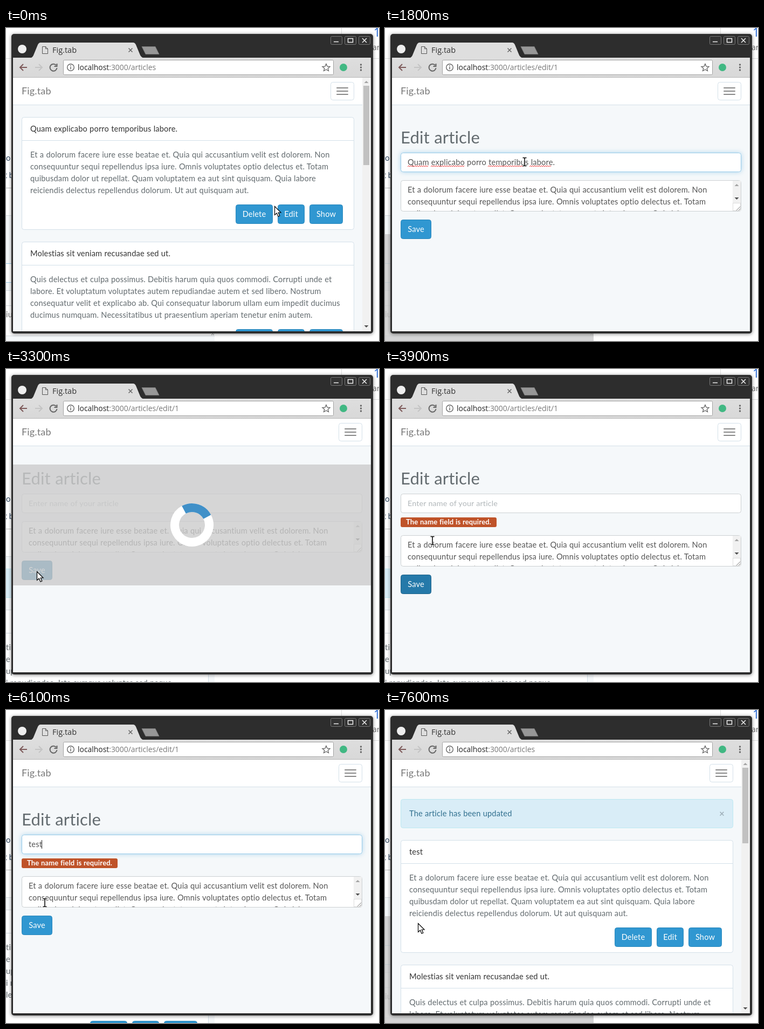
Animation of 692 by 580 pixels, one loop 8 s. Source, as an HTML page:

```html
<!DOCTYPE html>
<html lang="en">
<head>
<meta charset="utf-8">
<title>Article editor</title>
<style>
  html, body { margin: 0; width: 100%; height: 100%; overflow: hidden; background: #fff; }
  svg { display: block; width: 100%; height: 100%; }
  text { font-family: Lato, sans-serif; letter-spacing: .16px; word-spacing: .3px; white-space: pre; }
  .ui { font-family: "Open Sans", "Noto Sans", sans-serif; letter-spacing: 0; word-spacing: 0; }
  .window { filter: drop-shadow(0 1px 3px rgba(0, 0, 0, .5)); }
</style>
</head>
<body>
<svg id="stage" viewBox="0 0 692 580">
  <clipPath id="pageClip"><rect x="13" y="92" width="664" height="470"/></clipPath>
  <clipPath id="areaClip"><rect x="30" y="283" width="615" height="56"/></clipPath>
  <linearGradient id="toolbar" x2="0" y2="1">
    <stop stop-color="#dedede"/><stop offset="1" stop-color="#d8d8d8"/>
  </linearGradient>
  <g id="backdrop"></g>
  <g id="chrome"></g>
  <g id="page" clip-path="url(#pageClip)"></g>
  <g id="pointer"></g>
</svg>
<script>
const LOOP = 8000, STEP = 100;
const SITE = 'Fig.tab';
const BLUE = '#3097d1', LINE = '#d3e0e9', BG = '#f5f8fa', GREY = '#636b6f', VEIL = 'rgba(204,204,204,.8)';
const ARTICLES = [
  ['Quam explicabo porro temporibus labore.', [
    'Et a dolorum facere iure esse beatae et. Quia qui accusantium velit est dolorem. Non',
    'consequuntur sequi repellendus ipsa iure. Omnis voluptates optio delectus et. Totam',
    'quibusdam dolor ut repellat. Quam voluptatem ea aut sint quisquam. Quia labore',
    'reiciendis delectus repellendus dolorum. Ut aut quisquam aut.']],
  ['Molestias sit veniam recusandae sed ut.', [
    'Quis delectus et culpa possimus. Debitis harum quia quos commodi. Corrupti unde et',
    'labore. Et voluptatum voluptates autem repudiandae autem et sed libero. Nostrum',
    'consequatur velit et explicabo ab. Qui consequatur laborum ullam eum impedit ducimus',
    'ducimus numquam. Necessitatibus ut praesentium aperiam tenetur enim autem.']]
];

// Pointer path: time, x, y
const PATH = [
  [0, 498, 330], [100, 498, 330], [200, 520, 336], [300, 534, 338], [800, 534, 338],
  [1300, 267, 261], [1400, 262, 251], [1500, 262, 251], [1600, 259, 248], [2400, 259, 248],
  [2800, 101, 371], [2900, 72, 374], [3000, 57, 375], [3600, 57, 375], [3900, 88, 318],
  [4000, 89, 318], [4400, 89, 250], [5700, 89, 250], [6100, 72, 357], [6400, 61, 395], [LOOP, 61, 395]
];

const clamp = v => Math.max(0, Math.min(1, v));
const inside = (p, x, y, w, h) => p.x >= x && p.x < x + w && p.y >= y && p.y < y + h;

const rect = (x, y, w, h, fill, r = 0, extra = '') =>
  `<rect x="${x}" y="${y}" width="${w}" height="${h}" fill="${fill}" rx="${r}" ${extra}/>`;
const box = (x, y, w, h, fill, stroke, r = 0, extra = '') =>
  rect(x + .5, y + .5, w - 1, h - 1, fill, r, `stroke="${stroke}" ${extra}`);
const path = (d, stroke, width = 1, fill = 'none') =>
  `<path d="${d}" fill="${fill}" stroke="${stroke}" stroke-width="${width}"/>`;
const text = (x, y, s, fill, size = 14.6, extra = '') =>
  `<text x="${x}" y="${y}" fill="${fill}" font-size="${size}" ${extra}>${s}</text>`;
const uiText = (x, y, s, fill, size = 14) => text(x, y, s, fill, size, 'class="ui"');
const lines = (x, y, list, fill) => list.map((s, i) => text(x, y + i * 22, s, fill)).join('');
const button = (x, y, w, label, dark) =>
  box(x, y, w, 36, dark ? '#2579a9' : BLUE, dark ? '#1f648b' : '#2a88bd', 4) +
  text(x + w / 2, y + 23, label, '#fff', 14.6, 'text-anchor="middle"');

function pointerAt(t) {
  const i = PATH.findIndex(k => k[0] > t);
  const [t0, x0, y0] = PATH[i - 1], [t1, x1, y1] = PATH[i];
  const k = (t - t0) / (t1 - t0);
  return { x: Math.round(x0 + (x1 - x0) * k), y: Math.round(y0 + (y1 - y0) * k) };
}

function stateAt(t) {
  const s = { t, p: pointerAt(t) };
  s.editing = t >= 500 && t < 7300;
  s.updated = t >= 7300;
  s.spinStart = t >= 500 && t < 1200 ? 556 : t >= 3200 && t < 3800 ? 3206 : t >= 6700 && t < 7300 ? 6750 : null;
  s.loading = s.spinStart !== null;
  s.loaded = t >= 1200;
  s.error = t >= 3800;
  s.shift = s.error ? 26 : 0;
  s.typed = [4700, 4800, 5100, 5600].filter(k => t >= k).length;
  s.value = !s.loaded ? '' : t < 2400 ? ARTICLES[0][0] : 'test'.slice(0, s.typed);
  s.selected = t >= 2000 && t < 2400;
  s.focus = t < 3200 ? clamp((t - 1500) / 300) : t < 6700 ? clamp((t - 4500) / 300) : 0;
  s.saveFocus = (t >= 3200 && t < 4600) || t >= 6700;
  const active = !s.loading;
  s.overEdit = !s.editing && inside(s.p, 504, 327 + (s.updated ? 76 : 0), 50, 36);
  s.overSave = s.editing && active && inside(s.p, 29, 355 + s.shift, 57, 36);
  s.overField = s.editing && active &&
    (inside(s.p, 29, 231, 632, 36) || inside(s.p, 29, 282 + s.shift, 616, 58));
  return s;
}

function drawBackdrop({ t }) {
  const rule = (y, c = '#d5dbe0') => rect(0, y, 387, 1, c);
  let out = rect(0, 0, 692, 580, '#fff') + rect(0, 56, 692, 1, '#ddd') + rect(622, 0, 1, 56, '#ddd') +
    uiText(682, 16, '1', '#1a5fd0', 22) + uiText(680, 41, 'ar', '#666') +
    uiText(0, 246, 'o', '#1c3550') + uiText(-3, 278, 't b', '#1c3550') +
    rect(0, 296, 20, 1, '#bbb') + rect(0, 347, 387, 233, BG) + rule(347);
  if (t < 2300 || t >= 7600) {
    out += rect(0, 437, 387, 34, '#fff') + rule(436, '#98cbe8') + rule(471, '#98cbe8') +
      rect(0, 486, 387, 84, '#fff') + rule(486) + rule(514) + text(0, 536, 'iu', '#777') + rule(570) +
      path('M381 569l5-5M384 569l2-2', '#777');
    if (t >= 1600) out += rect(0, 382, 387, 198, VEIL);
  } else if (t < 4700) {
    out += rect(0, 370, 387, 54, '#d9edf7') + rule(370, '#bce8f1') + rule(423, '#bce8f1') +
      rect(0, 446, 375, 134, '#fff') + rule(446) + rule(489) + rect(375, 446, 1, 134, LINE) +
      lines(0, 521, ['tiu', 'e', 'up', 'i repudiandae. Iste cumque voluptas sed neque'], GREY);
  } else {
    out += rect(0, 370, 375, 210, '#fff') + rule(370) + rule(413) + rect(375, 370, 1, 210, LINE) +
      lines(0, 445, ['tiu', 'e', 'up', 'i r', 'le'], GREY) +
      button(156, 576, 69, '') + button(234, 576, 50, '') + button(293, 576, 62, '');
  }
  return out;
}

function drawChrome({ editing }) {
  const windowButton = (x, glyph) => box(x, 15, 22, 16, '#333', '#777', 2) + path(glyph, '#eee', 1.5);
  return '<g class="window">' + rect(10, 11, 671, 555, '#2d2d2d', 5) + '</g>' +
    '<circle cx="30" cy="39" r="8" fill="#eee"/>' +
    path('M46 55.5Q50 54 52 48L59 31Q61 27 64 27H236Q239 27 241 31L248 48Q250 54 255 55.5Z', 'none', 0, '#dedede') +
    path('M67.5 34.5h6l4 4v9h-10zM73.500 34.500v4h4', '#555') +
    uiText(86, 46, SITE, '#333', 14.5) + path('M227.500 37.500l7 7m0-7l-7 7', '#666', 1.5) +
    path('M252 34.500H277L284 48.500H259Z', '#777', 1, '#979797') +
    windowButton(602, 'M608 25.500h9') + windowButton(628, 'M634.500 19.500h9v7h-9z') +
    windowButton(654, 'M661 19l8 8m0-8l-8 8') +
    rect(13, 55, 664, 37, 'url(#toolbar)') + rect(13, 91, 664, 1, '#b6b6b6') +
    path('M39 73H26M32 67l-6 6 6 6', '#7d5a5a', 2) + path('M54 73h13M61 67l6 6-6 6', '#c4c4c4', 2) +
    path('M93 69a6.500 6.500 0 1 0 1.500 5M94.500 66v5h-5', '#666', 2) +
    box(106, 59, 502, 28, '#fff', '#a3a3a3', 2) +
    '<circle cx="120" cy="73" r="6.3" fill="none" stroke="#666" stroke-width="1.4"/>' +
    path('M120 69v1.700M120 72v4.500', '#666', 1.5) +
    uiText(133, 78, 'localhost<tspan fill="#777">:3000/articles' + (editing ? '/edit/1' : '') + '</tspan>', '#222', 13.9) +
    path('M594 66.500l2 4.600 5 .4-3.800 3.200 1.200 4.800-4.400-2.600-4.400 2.600 1.200-4.800-3.800-3.200 5-.4z', '#666', 1.3) +
    '<circle cx="626" cy="73" r="7" fill="#41b883"/>' +
    [68, 73, 78].map(y => `<circle cx="658.5" cy="${y}" r="1.7" fill="#666"/>`).join('');
}

function drawNavbar(right) {
  return rect(13, 92, 664, 50, '#fff') + rect(13, 142, 664, 1, LINE) + text(29, 123, SITE, '#777', 18) +
    box(right - 44, 100, 44, 34, '#fff', LINE, 4) +
    [110, 116, 122].map(y => rect(right - 33, y, 22, 2, '#888', 1)).join('');
}

function drawList({ updated, overEdit }) {
  const top = updated ? 241 : 165;
  let out = drawNavbar(646);
  if (updated) {
    out += box(29, 165, 617, 54, '#d9edf7', '#bce8f1', 4) +
      text(45, 197, 'The article has been updated', '#31708f') + text(620, 198, '×', '#9fb0ba', 17, 'font-weight="700"');
  }
  ARTICLES.forEach(([title, body], i) => {
    const y = top + i * 231;
    out += box(29, y, 617, 209, '#fff', LINE, 4) + rect(30, y + 43, 615, 1, LINE) +
      text(45, y + 27, updated && !i ? 'test' : title, '#333') + lines(45, y + 75, body, GREY) +
      button(426, y + 162, 69, 'Delete') + button(504, y + 162, 50, 'Edit', overEdit && !i) +
      button(563, y + 162, 62, 'Show');
  });
  return out + rect(661, 92, 16, 470, '#f1f1f1') + rect(663, 107, 11, updated ? 140 : 147, '#c1c1c1') +
    path('M664.500 102l4-4 4 4z', 'none', 0, '#a3a3a3') + path('M664.500 551l4 4 4-4z', 'none', 0, '#505050');
}

function squiggle(from, to) {
  let d = `M${from} 257`;
  for (let x = from + 2, up = true; x <= to; x += 2, up = !up) d += `L${x} ${up ? 255 : 257}`;
  return path(d, '#e33', 1);
}

function drawNameField(s) {
  const glow = `style="filter:drop-shadow(0 0 4px rgba(152,203,232,${s.focus * .8}))"`;
  let out = box(29, 231, 632, 36, '#fff', s.focus > .5 ? '#98cbe8' : '#ccd0d2', 4, s.focus ? glow : '');
  if (s.selected) out += rect(42, 240, 269, 18, '#3390ff');
  out += s.value ? text(42, 254, s.value, s.selected ? '#fff' : '#555')
    : text(42, 254, 'Enter name of your article', '#b1b7ba', 14.3);
  if (s.focus && s.value.length > 4 && !s.selected) {
    out += squiggle(42, 80) + squiggle(85, 148) + squiggle(191, 262) + squiggle(268, 308);
  }
  if (s.focus && s.value.length <= 4) out += rect([42, 47, 55, 62, 66][s.typed], 241, 1, 16, '#222');
  return out;
}

function drawTextArea(loaded) {
  const grip = path('M652 338l7-7M656 338l3-3', '#777');
  const field = box(29, 282, 632, 58, '#fff', '#ccd0d2', 4);
  if (!loaded) return field + text(42, 305, 'Enter your text', '#b1b7ba') + grip;
  return field + `<g clip-path="url(#areaClip)">${lines(42, 305, ARTICLES[0][1].slice(0, 3), '#555')}</g>` +
    rect(645, 283, 15, 42, '#f1f1f1') + box(645, 324, 15, 15, '#fff', '#ddd') + grip +
    path('M648.500 293l4-4 4 4z', 'none', 0, '#a3a3a3') + path('M648.500 314l4 4 4-4z', 'none', 0, '#505050');
}

function drawSpinner(cy, angle) {
  const a = 32 * Math.SQRT1_2;
  return `<g transform="translate(345 ${cy}) rotate(${angle})">
    <circle r="32" fill="none" stroke="#fff" stroke-width="16"/>
    ${path(`M${-a} ${-a}A32 32 0 0 1 ${a} ${-a}`, '#4090c8', 16)}</g>`;
}

function drawForm(s) {
  let out = drawNavbar(661) + text(29, 214, 'Edit article', GREY, 31) + drawNameField(s);
  if (s.error) {
    out += rect(29, 275, 178, 18, '#bf5329', 3) +
      text(118, 288, 'The name field is required.', '#fff', 13, 'font-weight="700" text-anchor="middle"');
  }
  out += `<g transform="translate(0 ${s.shift})">` + drawTextArea(s.loaded) +
    button(29, 355, 57, 'Save', s.overSave || s.saveFocus) + '</g>';
  if (s.loading) {
    const height = 224 + s.shift;
    out += rect(13, 177, 664, height, VEIL) + drawSpinner(177 + height / 2, (s.t - s.spinStart) * .18);
  }
  return out;
}

function drawPointer(s) {
  let shape;
  if (s.overField) {
    const beam = 'M-3.500-7.500H-1Q0-7.500 0-6.500Q0-7.500 1-7.500H3.500M0-7V7M-3.500 7.500H-1Q0 7.500 0 6.500Q0 7.500 1 7.500H3.500';
    shape = path(beam, '#fff', 3) + path(beam, '#000', 1.5);
  } else if (s.overEdit || s.overSave) {
    shape = path('M-1.500 1Q0-1 1.500 1V8L10 9.500Q11 10 11 12L9.500 19H0L-5 12Q-5 10-3 10.500L-1.500 12Z', '#000', 1.2, '#fff');
  } else {
    shape = path('M.5.5V16.500L4.300 13L7 19.300L9.800 18L7.200 12H12Z', '#000', 1.2, '#fff');
  }
  return `<g transform="translate(${s.p.x} ${s.p.y})">${shape}</g>`;
}

const layers = Object.fromEntries(['backdrop', 'chrome', 'page', 'pointer'].map(id => [id, document.getElementById(id)]));
let shown = -1;

function render(now) {
  const t = Math.floor(now % LOOP / STEP) * STEP;
  if (t !== shown) {
    shown = t;
    const s = stateAt(t);
    layers.backdrop.innerHTML = drawBackdrop(s);
    layers.chrome.innerHTML = drawChrome(s);
    layers.page.innerHTML = rect(13, 92, 664, 470, BG) + (s.editing ? drawForm(s) : drawList(s));
    layers.pointer.innerHTML = drawPointer(s);
  }
  requestAnimationFrame(() => render(performance.now()));
}
render(performance.now());
</script>
</body>
</html>
```
